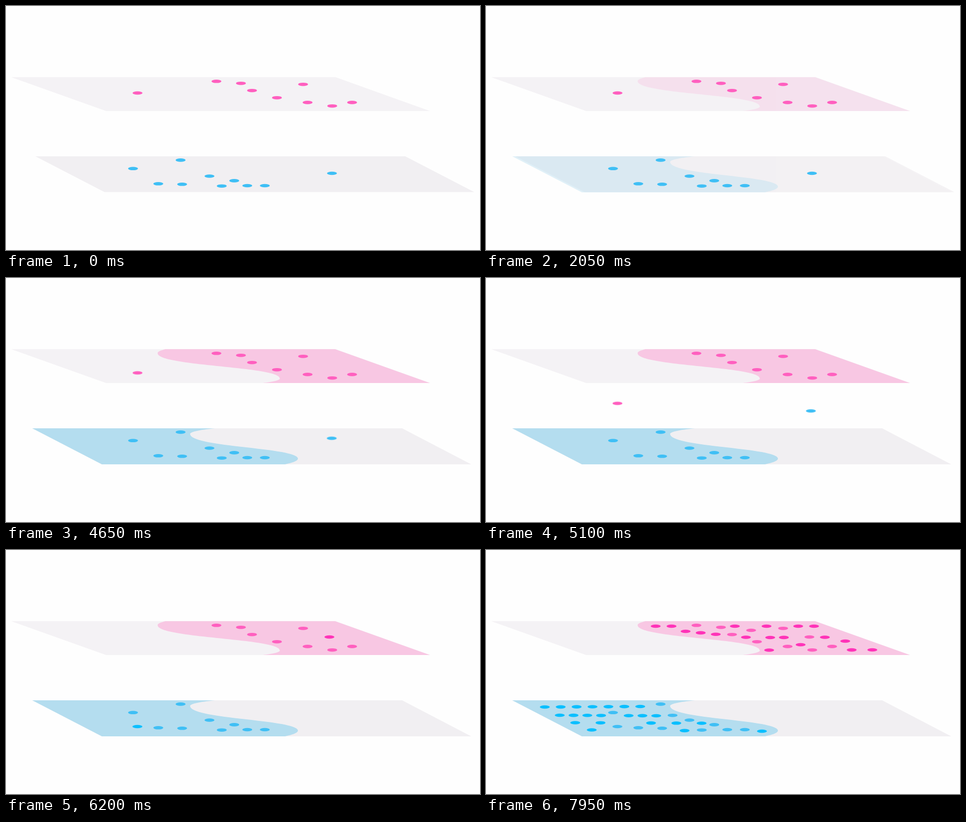
An HTML page that plays this animation: 919x474 px, repeating every 8 s.

```html
<!DOCTYPE html>
<html lang="en">
<head>
<meta charset="utf-8">
<title>Two layers</title>
<style>
  :root { --pink: #ff5fbf; --blue: #3fbff5; --hot-pink: #ff33b8; --hot-blue: #0abfff; }
  html, body { margin: 0; width: 100%; height: 100%; overflow: hidden; background: #fefefe; }
  svg { display: block; width: 100%; height: 100%; }

  .plain, .split, .mover, .fresh { animation: 8s linear infinite; }
  .plain { animation-name: fade-out; }
  .split { animation-name: fade-in; }
  .fresh { opacity: 0; animation-name: arrive; }
  .pink { fill: var(--pink); }
  .blue { fill: var(--blue); }
  .hot.pink { fill: var(--hot-pink); }
  .hot.blue { fill: var(--hot-blue); }
  .down { animation-name: sink, to-blue; }
  .up { animation-name: rise, to-pink; }

  @keyframes fade-out { 0%, 25.3% { opacity: 1; } 26.9%, 100% { opacity: 0; } }
  @keyframes fade-in { 0%, 25% { opacity: 0; } 26.6%, 100% { opacity: 1; } }
  @keyframes arrive { 0%, 91.9% { opacity: 0; } 98.75%, 100% { opacity: 1; } }

  @keyframes sink {
    0%, 53.5% { transform: none; animation-timing-function: ease-in-out; }
    75.9%, 100% { transform: translate(-.3px, 174px); }
  }
  @keyframes rise {
    0%, 53.5% { transform: none; animation-timing-function: ease-in-out; }
    75.9%, 100% { transform: translate(-5px, -156px); }
  }
  @keyframes to-blue {
    0%, 66.9% { fill: var(--pink); }
    75%, 91.9% { fill: var(--hot-blue); }
    98.75%, 100% { fill: var(--blue); }
  }
  @keyframes to-pink {
    0%, 66.9% { fill: var(--blue); }
    75%, 91.9% { fill: var(--hot-pink); }
    98.75%, 100% { fill: var(--pink); }
  }
</style>
</head>
<body>
<svg id="stage" viewBox="0 0 919 474" preserveAspectRatio="none">
  <path fill="#f4f2f5" d="M10 138.3H639L822 204H194Z"/>
  <path class="plain" fill="#f1eff2" d="M57 292H774L908 361.5H191Z"/>
  <g class="split">
    <path fill="#f1eff2" d="M51 292H768L902 362H186Z"/>
    <path fill="#f8c7e3" d="M309 138.3C299 141 294 143 294 146C294 171.5 531 171.5 531 195C531 199 516 202 498 204H822L638 138.3Z"/>
    <path fill="#b4ddef" d="M51 292H405C375 295 357 299 357 303C357 329 566 329 566 351C566 355 556 359 541 362H186Z"/>
  </g>
</svg>
<script>
  const stage = document.getElementById('stage');
  const placed = [];

  function dot(cls, cx, cy) {
    const el = document.createElementNS(stage.namespaceURI, 'ellipse');
    const attrs = { class: cls, cx, cy, rx: 9.6, ry: 3.3 };
    for (const name in attrs) el.setAttribute(name, attrs[name]);
    stage.append(el);
  }

  function point(cls, x, y) {
    placed.push([x, y]);
    dot(cls, x, y);
  }

  // Depth is foreshortened, so vertical gaps count double.
  const isFree = (x, y) => placed.every(([px, py]) => Math.hypot(x - px, 2 * (y - py)) > 24);

  // Spreads n evenly spaced dots along a line, leaving out crowded places.
  function row(cls, n, x0, y0, x1, y1) {
    for (let i = 0; i < n; i++) {
      const k = i / (n - 1), x = x0 + (x1 - x0) * k, y = y0 + (y1 - y0) * k;
      if (isFree(x, y)) dot(cls, x, y);
    }
  }

  const pinks = [[408, 146.3], [455.5, 150.2], [477, 164.2], [525.3, 178.2], [576, 152.2], [584.7, 187.4], [632.5, 194.2], [671, 187.4]];
  const blues = [[246.3, 315.8], [338.5, 299.4], [295.3, 345.3], [341.5, 346.3], [394.5, 330.5], [418.3, 349.7], [442.5, 339.4], [467.8, 349], [501.8, 349]];
  pinks.forEach(p => point('pink', ...p));
  blues.forEach(p => point('blue', ...p));
  point('fresh pink', 514, 156);
  point('fresh blue', 361.7, 321.2);

  // Where the two movers come to rest.
  placed.push([254.7, 343], [627, 169]);

  const hotPink = 'fresh hot pink', hotBlue = 'fresh hot blue';
  row(hotPink, 11, 329, 148, 636, 148);
  row(hotPink, 5, 387, 158, 504, 169.5);
  row(hotPink, 5, 551, 170, 657, 169.5);
  row(hotPink, 2, 610, 184, 696.5, 177);
  row(hotPink, 6, 549, 194.5, 749, 194);

  row(hotBlue, 7, 114, 305, 299, 304);
  row(hotBlue, 8, 143, 321, 330, 322);
  row(hotBlue, 6, 173, 335.5, 418, 336.5);
  row(hotBlue, 12, 205, 349.5, 535, 352);

  dot('mover down', 255, 169);
  dot('mover up', 632, 325);
</script>
</body>
</html>
```
